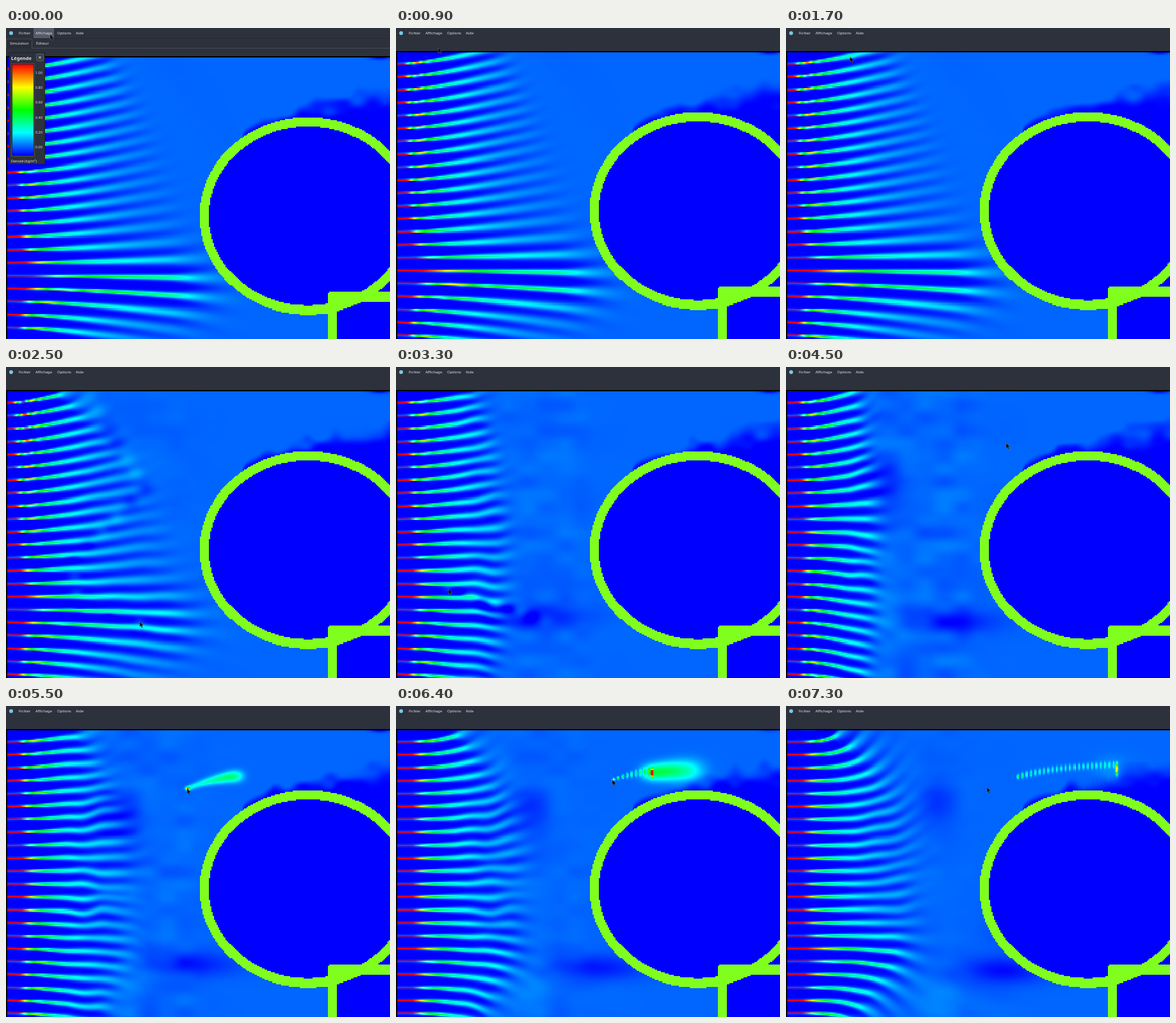
An HTML page with a canvas for the animation above (7400 ms loop, 600 by 486 pixels).

```html
<!DOCTYPE html>
<html lang="fr">
<head>
<meta charset="utf-8">
<title>Simulation</title>
<style>
  html, body { margin: 0; width: 100%; height: 100%; overflow: hidden; background: #000; }
  canvas { position: absolute; left: 2px; width: 597.92px; height: 450.46px; image-rendering: pixelated; }
  svg { position: absolute; left: 0; top: 0; }
  text { font: 5.9px "Noto Sans", sans-serif; fill: #e4e5e8; }
  .title { font-size: 7.5px; font-weight: 700; }
  .small, #labels text { font-size: 5.5px; }
</style>
</head>
<body>
<canvas id="field" width="296" height="223"></canvas>
<svg width="600" height="486" viewBox="0 0 600 486">
  <defs>
    <linearGradient id="scale" x1="0" y1="0" x2="0" y2="1">
      <stop offset="0" stop-color="#f00"/><stop offset=".25" stop-color="#ff0"/>
      <stop offset=".5" stop-color="#0f0"/><stop offset=".75" stop-color="#0ff"/>
      <stop offset="1" stop-color="#00f"/>
    </linearGradient>
  </defs>
  <g id="header">
    <rect y="-20" width="600" height="58"/>
    <rect y="-20" width="600" height="56" fill="#2d313b"/>
  </g>
  <g id="panels">
    <rect x="43" width="32" height="16" fill="#565a69"/>
    <path d="M0 16.5H600" stroke="#252932"/>
    <path d="M40 31.5H600" stroke="#454a55"/>
    <path d="M.5 32V17H40.5V32" fill="#292d36" stroke="#4a4f5b"/>
    <text x="6" y="26">Simulation</text>
    <text x="47" y="26">Éditeur</text>
    <rect x="5.5" y="38.5" width="55" height="174" fill="#2d313b" stroke="#20242c"/>
    <text class="title" x="8" y="49.5">Légende</text>
    <rect x="47.5" y="40.5" width="11" height="11" rx="1" fill="#3a3f4b" stroke="#555b69"/>
    <path d="M51 44l4 4m0-4l-4 4" stroke="#e4e5e8" stroke-width=".8"/>
    <rect x="8.5" y="55.5" width="36" height="145" fill="#22262e" stroke="#4a4f5b"/>
    <rect x="10" y="57" width="33" height="142" fill="url(#scale)"/>
    <g id="labels"></g>
    <text class="small" x="8" y="209.5">Densité (kg/m³)</text>
  </g>
  <circle cx="8" cy="8" r="3" fill="#79c7e6"/>
  <text x="20" y="10">Fichier</text>
  <text x="46" y="10">Affichage</text>
  <text x="80" y="10">Options</text>
  <text x="109" y="10">Aide</text>
  <path id="cursor" d="M0 0V8L1.8 6.4L3.3 9.4L4.6 8.8L3.2 5.9H5.8Z" fill="#050507" stroke="#8a8d98" stroke-width=".4"/>
</svg>
<script>
const LOOP = 7400, STEP = 100, CELL = 2.02, LEFT = 2, TOP = 37;
const FIRST_JET = TOP + 9.5 * CELL, JET_GAP = 10 * CELL, AMBIENT = 0.1, FLOW = 0.035;
const COLS = 296, ROWS = 223, JET_COLS = 200;
const $ = id => document.getElementById(id);
const clamp = (x, a = 0, b = 1) => Math.min(b, Math.max(a, x));
const mix = (a, b, f) => a + (b - a) * f;
const smooth = (a, b, x) => { const f = clamp((x - a) / (b - a)); return f * f * (3 - 2 * f); };
const bell = (x, r) => Math.exp(-((x / r) ** 2));
const xAt = i => LEFT + (i + 0.5) * CELL;
const yAt = j => TOP + (j + 0.5) * CELL;
const column = x => clamp(Math.round((x - LEFT) / CELL - 0.5), 0, COLS - 1);
const row = y => clamp(Math.round((y - TOP) / CELL - 0.5), 0, ROWS - 1);

function hash(i, j) {
  const s = Math.sin(i * 127.1 + j * 311.7) * 43758.5453;
  return 2 * (s - Math.floor(s)) - 1;
}

function noise(x, y) {
  const i = Math.floor(x), j = Math.floor(y), f = smooth(0, 1, x - i), g = smooth(0, 1, y - j);
  return mix(mix(hash(i, j), hash(i + 1, j), f), mix(hash(i, j + 1), hash(i + 1, j + 1), f), g);
}

// The jets dissolve along a parabola: furthest at (tip, tipY), pulled back by curve.
// They part above and below split, and eddy is the strength of the turbulence.
const calm = { tip: 340, tipY: 480, curve: 35, lift: 0.17, split: 372, power: 1.8, eddy: 0 };
const flowKeys = [
  { ...calm, t: 0 },
  { ...calm, t: 1700 },
  { t: 2500, tip: 330, tipY: 440, curve: 62, lift: 0.16, split: 365, power: 1.8, eddy: 0.25 },
  { t: 3300, tip: 200, tipY: 300, curve: 35, lift: 0.12, split: 330, power: 2, eddy: 0.7 },
  { t: 4500, tip: 165, tipY: 300, curve: 25, lift: 0.2, split: 250, power: 2.5, eddy: 1 },
  { t: 5500, tip: 235, tipY: 290, curve: 70, lift: 0.1, split: 270, power: 2, eddy: 0.8 },
  { t: 7300, tip: 235, tipY: 280, curve: 115, lift: 0.2, split: 340, power: 5, eddy: 0.3 },
  { t: LOOP }
];
const pointerKeys = [[0, 69, 10], [900, 66, 31], [1300, 60, 8], [1700, 100, 45], [2000, 200, 190], [2250, 95, 300],
  [2400, 110, 380], [2500, 209, 398], [3300, 82, 347], [4300, 90, 7], [4500, 344, 119], [4850, 285, 130],
  [5500, 283, 129], [5900, 335, 115], [7200, 343, 116], [7300, 314, 127], [LOOP, 314, 127]]
  .map(([t, x, y]) => ({ t, x, y }));

function interpolate(keys, t) {
  const n = keys.findIndex(k => k.t > t), a = keys[n - 1], b = keys[n], f = (t - a.t) / (b.t - a.t);
  return Object.fromEntries(Object.keys(a).map(k => [k, mix(a[k], b[k] ?? a[k], f)]));
}

const ctx = $('field').getContext('2d');
const image = ctx.createImageData(COLS, ROWS);
const density = new Float32Array(COLS * ROWS);

$('labels').innerHTML = [0, 1, 2, 3, 4, 5].map(i =>
  `<text x="46" y="${72 + i * 23.2}">${(1 - i / 5).toFixed(2)}</text>`).join('');

function addJets(flow, t) {
  const jets = Array.from({ length: 32 }, (_, n) => {
    const y0 = FIRST_JET + (n - 5) * JET_GAP;
    const reach = Math.max(85, flow.tip - flow.curve * ((y0 - flow.tipY) / 200) ** 2);
    return {
      y0, reach,
      lift: flow.lift * reach * Math.tanh((y0 - flow.split) / 100),
      spread: 1 - 0.7 * (1 - flow.eddy) * bell(y0 - 390, 40)
    };
  });
  for (let i = 0; i < JET_COLS; i++) {
    const x = xAt(i), wobble = 9 * flow.eddy * smooth(80, 160, x);
    for (const jet of jets) {
      const growth = (x / jet.reach) ** flow.power;
      jet.y = jet.y0 + jet.lift * 1.3 * growth / (1 + 0.3 * growth)
        + wobble * noise((x - FLOW * t) / 40, jet.y0 / 45);
    }
    for (let k = 1; k < jets.length - 1; k++) {
      const jet = jets[k], u = Math.max(0, x - 18) * jet.spread;
      const width = 0.75 + 0.04 * u * u / (u + 40) + 13 * smooth(0.75 * jet.reach, 1.3 * jet.reach, x);
      const gap = clamp((jets[k + 1].y - jets[k - 1].y) / 2, 8, 40);
      const peak = AMBIENT * gap / (width * 2.507);
      for (let j = row(jet.y - 3 * width); j <= row(jet.y + 3 * width); j++)
        density[j * COLS + i] += peak * Math.exp(-0.5 * ((yAt(j) - jet.y) / width) ** 2);
    }
  }
}

function addBlob(x, y, rx, ry, amount) {
  for (let j = row(y - 2.5 * ry); j <= row(y + 2.5 * ry); j++)
    for (let i = column(x - 2.5 * rx); i <= column(x + 2.5 * rx); i++)
      density[j * COLS + i] += amount * bell(xAt(i) - x, rx) * bell(yAt(j) - y, ry);
}

// Leaves puffs behind the pointer; shape gives size and density from age and index.
function addTrail(t, from, to, every, speed, climb, shape) {
  for (let n = 0, born = from; born <= Math.min(t, to); born = from + ++n * every) {
    const age = t - born, p = interpolate(pointerKeys, born);
    addBlob(p.x + speed * age, p.y - climb * (1 - Math.exp(-age / 600)), ...shape(age, n));
  }
}

// A broad patch that appears at t0 and floats away.
function addCloud(t, t0, x, y, vy, rx, ry, amount) {
  const age = t - t0;
  addBlob(x + 0.028 * age, y + vy * age, rx, ry, amount * smooth(-300, 300, age));
}

// Fraction of the flow left in the wake of the ring.
function wake(x, y, t) {
  if (x < 370) return 1;
  if (y > 286) return x > 516 ? 0 : 1;
  const d = x - 370;
  const edge = 160 - 75 * (d / 230) ** 0.6 + 12 * smooth(0, 80, d) * noise((x - 0.1 * t) / 22, y / 18);
  return 1 - smooth(-6, 7 + d * 0.13, y - edge);
}

const ellipse = (x, y, rx, ry) => ((x - 472) / rx) ** 2 + ((y - 286) / ry) ** 2 < 1;

// 0: fluid, 1: wall, 2: enclosed space
const solid = Uint8Array.from({ length: COLS * ROWS }, (_, n) => {
  const x = xAt(n % COLS), y = yAt(Math.floor(n / COLS));
  const inBox = x > 502 && y > 405 && x + y > 911;
  if (inBox && (x < 517 || y < 420)) return 1;
  if (ellipse(x, y, 155, 140)) return 2;
  if (ellipse(x, y, 169.5, 154.5)) return 1;
  return inBox ? 2 : 0;
});

function paint(t) {
  const flow = interpolate(flowKeys, t);
  density.fill(0);
  addJets(flow, t);
  for (let j = 0; j < ROWS; j++) for (let i = 0; i < COLS; i++) {
    const n = j * COLS + i, x = xAt(i), y = yAt(j);
    if (x > 330) density[n] = mix(density[n], AMBIENT, smooth(330, 400, x)) * wake(x, y, t);
    else if (flow.eddy && x > 90) density[n] += 0.025 * flow.eddy * smooth(90, 150, x) * smooth(330, 260, x)
      * noise((x - FLOW * t) / 30, y / 20);
  }

  addTrail(t, 1700, 3300, 50, FLOW, 0, (age, n) =>
    [8 + age / 120, 6 + age / 120, (n % 4 < 2 ? 0.05 : -0.05) * smooth(1300, 500, age)]);
  addTrail(t, 4850, 5500, 40, 0.12, 32, age =>
    [4 + age / 90, 3 + age / 110, 0.09 * smooth(2200, 400, age) + 0.3 * Math.exp(-age / 30)]);
  addTrail(t, 5500, 7200, 55, 0.13, 26, age =>
    [1.6, 1.5 + 3 * smooth(0, 300, age), 0.2 + 0.5 * Math.exp(-age / 150)]);
  addCloud(t, 3000, 215, 390, 0.006, 75, 20, -0.08);
  addCloud(t, 4200, 150, 180, -0.01, 28, 38, -0.045);
  addCloud(t, 4200, 148, 395, 0.02, 38, 38, 0.035);
  addBlob(584, TOP, 15, 4, -0.12 * smooth(7000, 5500, t));

  for (let n = 0; n < density.length; n++) {
    const v = solid[n] === 2 ? 0 : clamp(density[n]);
    const rgb = solid[n] === 1 ? [128, 255, 30]
      : [4 * v - 2, Math.min(4 * v, 4 - 4 * v), 2 - 4 * v].map(c => 255 * clamp(c));
    image.data.set(rgb, n * 4);
    image.data[n * 4 + 3] = 255;
  }
  ctx.putImageData(image, 0, 0);

  const panelsOpen = t < 900, shift = panelsOpen ? 8 : 0, p = interpolate(pointerKeys, t);
  $('panels').style.display = panelsOpen ? '' : 'none';
  $('header').setAttribute('transform', `translate(0 ${shift})`);
  $('field').style.top = TOP + shift + 'px';
  $('cursor').setAttribute('transform', `translate(${p.x} ${p.y})`);
}

const start = performance.now();
let shown = -1;
function tick() {
  const t = Math.floor(((performance.now() - start) % LOOP) / STEP) * STEP;
  if (t !== shown) paint(shown = t);
  requestAnimationFrame(tick);
}
tick();
</script>
</body>
</html>
```
